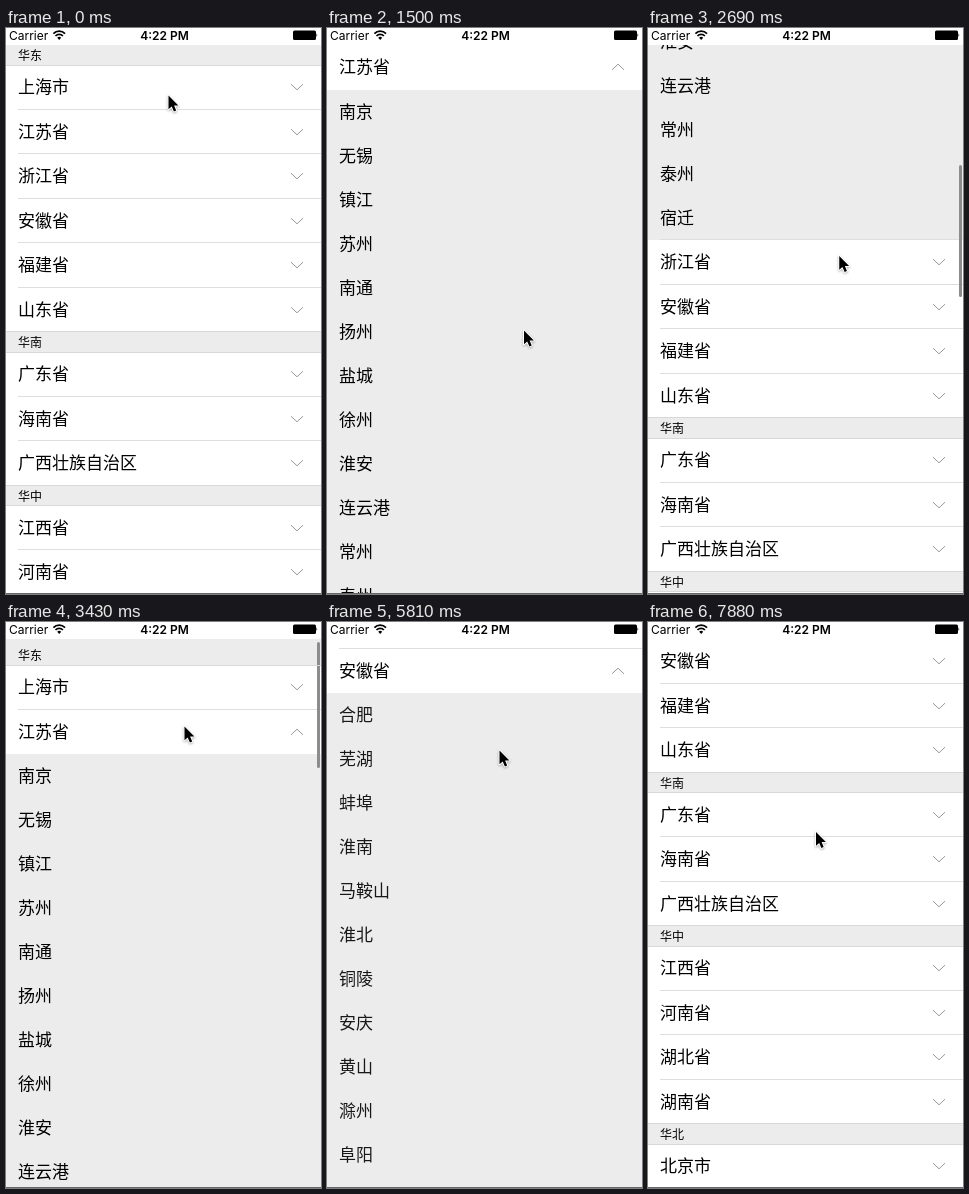
An HTML page that plays this animation: 315x566 px, repeating every 8000 ms.

```html
<!DOCTYPE html>
<html lang="zh-CN">
<head>
<meta charset="utf-8">
<title>省市列表</title>
<style>
html, body { margin: 0; width: 100%; height: 100%; overflow: hidden; background: #fff; }
#stage { position: relative; width: 315px; height: 566px; overflow: hidden; background: #fff; color: #000;
  font: 17px "Noto Sans CJK SC", "Noto Sans CJK", sans-serif; }
#status { position: absolute; inset: 0 0 auto; height: 17px; font: 12px/15px Inter, sans-serif; }
#status span { position: absolute; top: 0; left: 3px; white-space: nowrap; }
#status .clock { left: 0; width: 317px; text-align: center; font-weight: 600; }
#status svg { position: absolute; inset: 0; }
#view { position: absolute; inset: 17px 0 0; overflow: hidden; background: #ececec; }
#list { position: absolute; left: 0; right: 0; }
.head { position: relative; height: 20px; padding-left: 12px; background: #ececec; font-size: 12px; line-height: 19px; }
.head::after, .head:not(:first-child)::before, .row.sep::before {
  content: ""; position: absolute; left: 0; right: 0; height: 1px; background: #d8d8da; }
.head::after { bottom: -.5px; z-index: 1; }
.head::before { top: -1px; }
.row { position: relative; height: 44.5px; padding-left: 12px; line-height: 42px; background: #fff; }
.row.sep::before { left: 12px; top: -1px; background: #dedee0; }
.row svg { position: absolute; left: 282px; top: 13px; }
.kids { overflow: hidden; background: #ececec; }
.kids p { margin: 0; height: 44px; padding-left: 12px; line-height: 42px; }
#bar { position: absolute; left: 311px; width: 2.5px; border-radius: 1.5px; background: #8c8c8c; }
#edge { position: absolute; left: 0; right: 0; bottom: 0; height: 1px; background: #666; }
#cursor { position: absolute; left: -2px; top: -2px; filter: drop-shadow(0 1px 1px rgba(0,0,0,.3)); }
</style>
</head>
<body>
<div id="stage">
  <div id="view"><div id="list"></div><div id="bar"></div></div>
  <div id="status">
    <span>Carrier</span><span class="clock">4:22 PM</span>
    <svg width="315" height="17">
      <path d="M47.4 5.7A8 8 0 0 1 59 5.7M49.5 8A5 5 0 0 1 56.9 8" fill="none" stroke="#000" stroke-width="1.7"/>
      <path d="M53.2 12L51.2 9.8A2.8 2.8 0 0 1 55.2 9.8Z"/>
      <rect x="287" y="2.5" width="23" height="9.5" rx="1.5"/>
      <path d="M310.5 5.2Q312.3 7.2 310.5 9.2Z"/>
    </svg>
  </div>
  <div id="edge"></div>
  <svg id="cursor" width="18" height="24" viewBox="-2 -2 18 24">
    <path d="M.5.5V14.3L3.7 11.4 5.9 16.4 8.2 15.4 6.1 10.6H10.4Z" stroke="#fff" stroke-width="2" paint-order="stroke" stroke-linejoin="round"/>
  </svg>
</div>
<script>
// Times are in ticks: the screen refreshes once per tick.
const LOOP = 8000, TICK = 148.6, VIEW = 549, CONTENT = 2280;
const REGIONS = {
  华东: '上海市 江苏省 浙江省 安徽省 福建省 山东省',
  华南: '广东省 海南省 广西壮族自治区',
  华中: '江西省 河南省 湖北省 湖南省',
  华北: '北京市 天津市'
};
const CITIES = {
  江苏省: '南京 无锡 镇江 苏州 南通 扬州 盐城 徐州 淮安 连云港 常州 泰州 宿迁',
  安徽省: '合肥 芜湖 蚌埠 淮南 马鞍山 淮北 铜陵 安庆 黄山 滁州 阜阳 宿州 六安 亳州 池州 宣城'
};
const TAPS = { 江苏省: { open: 5.4, close: 29.4 }, 安徽省: { open: 37.4, close: 46.4 } };
const HOPS = [ // start, end, x, y
  [2, 4, 167, 102], [6, 10, 196.5, 302], [10, 14, 193.5, 125], [16, 20, 188, 330],
  [20, 23, 178, 104], [32, 38, 172, 128], [40, 45, 159.5, 50.5], [47, 53, 167.5, 209.5]
];

const $ = id => document.getElementById(id);
const clamp = x => Math.max(0, Math.min(1, x));
const half = x => Math.round(x * 2) / 2;
const ease = (t, start, len) => { const x = clamp((t - start) / len); return x * x * (3 - 2 * x); };
const coast = (t, start, len) => 1 - (1 - clamp((t - start) / len)) ** 2.4;
const pulse = (t, { open, close }) => ease(t, open, 2) - ease(t, close, 2);

function scrollAt(t) {
  const toTop = 64.5 * ease(t, 5.4, 2);
  const fling = 421.5 * coast(t, 10, 8);
  const back = -502 * ease(t, 18, 4) + 16 * coast(t, 22, 3);
  return half(toTop + fling + back + 64.5 * ease(t, 29.42, 2) + 89 * ease(t, 37.4, 2));
}

function pointerAt(t) {
  let x = 162, y = 67;
  for (const [start, end, toX, toY] of HOPS) {
    const k = ease(t, start, end - start);
    x += (toX - x) * k;
    y += (toY - y) * k;
  }
  return [x, y];
}

function add(parent, cls, html = '') {
  const el = document.createElement('div');
  el.className = cls;
  el.innerHTML = html;
  return parent.appendChild(el);
}

const arrow = '<svg width="18" height="18" viewBox="-9 -9 18 18">' +
  '<path d="M-6-2.8L0 2.8 6-2.8" fill="none" stroke="#999"/></svg>';
const folds = [];
for (const [region, names] of Object.entries(REGIONS)) {
  add($('list'), 'head', region);
  names.split(' ').forEach((name, i) => {
    const row = add($('list'), i ? 'row sep' : 'row', name + arrow);
    if (!CITIES[name]) return;
    const cities = CITIES[name].split(' ');
    const box = add($('list'), 'kids');
    const inner = add(box, '', cities.map(c => `<p>${c}</p>`).join(''));
    folds.push({ tap: TAPS[name], mark: row.querySelector('path'), box, inner, full: cities.length * 44 });
  });
}

function draw(t) {
  const y = scrollAt(t);
  $('list').style.top = -y + 'px';
  for (const f of folds) {
    const p = pulse(t, f.tap);
    f.box.style.height = half(p * f.full) + 'px';
    f.inner.style.opacity = p;
    f.mark.setAttribute('transform', `rotate(${180 * clamp(p * 1.4 - .25)})`);
  }
  const bar = $('bar').style;
  bar.top = 3 + Math.max(0, y) * VIEW / CONTENT + 'px';
  bar.height = VIEW * VIEW / CONTENT + Math.min(0, y) + 'px';
  bar.opacity = ease(t, 10, 1) - ease(t, 24, 3);
  const [px, py] = pointerAt(t);
  $('cursor').style.transform = `translate(${px}px, ${py}px)`;
}

const start = performance.now();
function loop() {
  draw(Math.floor((performance.now() - start) % LOOP / TICK));
  requestAnimationFrame(loop);
}
loop();
</script>
</body>
</html>
```
